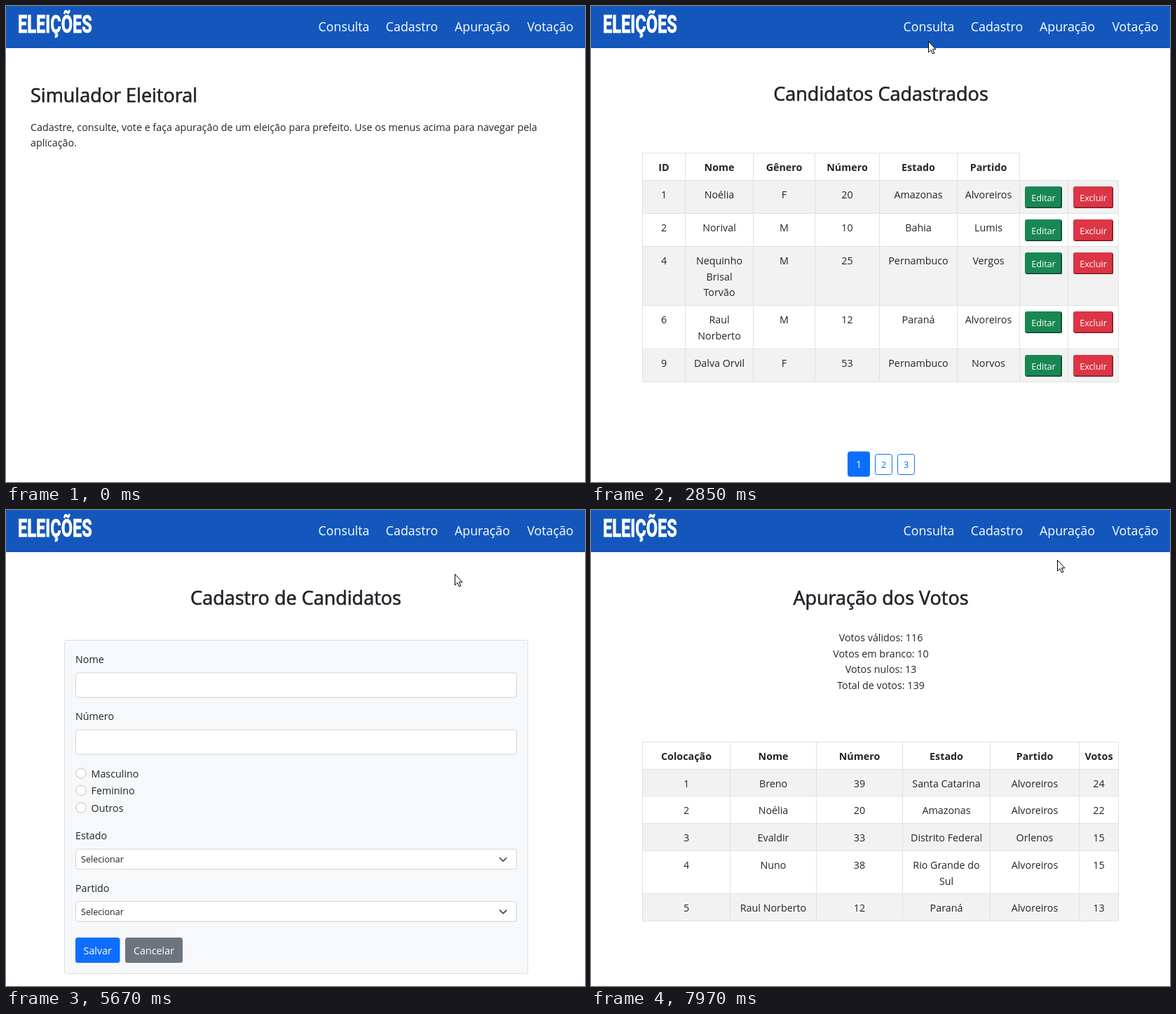
An HTML page that plays this animation: 826x678 px, repeating every 8 s.

```html
<!DOCTYPE html>
<html lang="pt-BR">
<head>
<meta charset="utf-8">
<title>Simulador Eleitoral</title>
<style>
html, body { margin: 0; width: 100%; height: 100%; overflow: hidden; background: #fff; }
svg { display: block; width: 100%; height: 100%; font: 14.3px "Open Sans", "Noto Sans", sans-serif; fill: #212529; }
.mid { text-anchor: middle; }
.bold { font-weight: 700; }
.title { font-size: 27px; stroke: #212529; stroke-width: .65px; }
.small { font-size: 12.6px; }
.nav { font-size: 17.8px; }
.brand { font: 700 34.5px Roboto, sans-serif; fill: #fff; stroke: #fff; stroke-width: .9px; }
.white { fill: #fff; }
.blue { fill: #0d6efd; }
</style>
</head>
<body>
<svg id="stage" viewBox="0 0 826 678"></svg>
<script>
const LOOP = 8000;
const MID = 413.5;
const LINE = 22.7;
const PAD = 16;
const LEFT = 73.5, WIDTH = 679;
const BORDER = '#dee2e6';

const text = (x, y, s, cls = '') => `<text x="${x}" y="${y}" class="${cls}">${s}</text>`;
const mid = (x, y, s, cls = '') => text(x, y, s, 'mid ' + cls);
const box = (x, y, w, h, fill, stroke = 'none', r = 0) =>
  `<rect x="${x}" y="${y}" width="${w}" height="${h}" rx="${r}" fill="${fill}" stroke="${stroke}"/>`;
const path = (d, stroke, extra = '') => `<path d="${d}" fill="none" stroke="${stroke}" ${extra}/>`;
const heading = s => mid(MID, 135, s, 'title');
const snap = v => Math.floor(v) + .5;

// Running edges of consecutive spans.
const edges = (start, sizes) => sizes.reduce((all, n) => [...all, all[all.length - 1] + n], [start]);

// Cells are split by "|", lines inside a cell by "/"; rows grow with their lines.
function table(top, widths, head, rows = [], minHeight = 0, extra = () => '') {
  const names = head.split('|');
  const cols = edges(LEFT, widths);
  const cells = [names, ...rows.map(r => r.split('|'))].map(r => r.map(c => c.split('/')));
  const heights = cells.map((r, i) =>
    Math.max(i ? minHeight : 0, PAD + LINE * Math.max(...r.map(c => c.length))));
  const ys = edges(top, heights).map(snap);
  const bottom = ys[ys.length - 1];
  let fills = '', lines = '', words = '';
  cells.forEach((row, r) => {
    if (r % 2) fills += box(LEFT, ys[r], WIDTH, ys[r + 1] - ys[r], '#f2f2f2');
    row.forEach((cell, c) => cell.forEach((s, n) =>
      words += mid(cols[c] + widths[c] / 2, ys[r] + 25.5 + n * LINE, s, r ? '' : 'bold')));
    if (r) words += extra(ys[r]);
  });
  ys.forEach((y, i) => lines += `M${LEFT} ${y}H${i ? LEFT + WIDTH : cols[names.length]}`);
  cols.forEach((x, i) => lines += `M${x} ${ys[i > names.length ? 1 : 0]}V${bottom}`);
  return fills + path(lines, BORDER) + words;
}

// Without rows, a fifth goes to the first column and the labels share the rest.
function emptyTable(top, head) {
  const pen = document.createElement('canvas').getContext('2d');
  pen.font = '700 14.3px "Open Sans", "Noto Sans", sans-serif';
  const first = WIDTH / 5;
  const sizes = head.split('|').slice(1).map(s => pen.measureText(s).width + PAD);
  const sum = sizes.reduce((a, b) => a + b);
  const widths = [first, ...sizes.map(n => n / sum * (WIDTH - first))];
  return table(top, widths, head) + box(LEFT, top + 39, first, PAD, '#f2f2f2', BORDER);
}

function rowButton(x, y, w, label, fill, shade) {
  return box(x, y, w, 31, fill, 'none', 3) +
    path(`M${x + 2} ${y + 30.2}H${x + w - 2}Q${x + w - .8} ${y + 30.2} ${x + w - .8} ${y + 29}V${y + 2}`, shade, 'stroke-width="1.6"') +
    mid(x + w / 2, y + 20.5, label, 'small white');
}

const listHead = 'ID|Nome|Gênero|Número|Estado|Partido';
const listPage = () => heading('Candidatos Cadastrados') +
  table(209.5, [61, 97, 88, 92, 111, 89, 69, 72], listHead, [
    '1|Noélia|F|20|Amazonas|Alvoreiros',
    '2|Norival|M|10|Bahia|Lumis',
    '4|Nequinho/Brisal/Torvão|M|25|Pernambuco|Vergos',
    '6|Raul/Norberto|M|12|Paraná|Alvoreiros',
    '9|Dalva Orvil|F|53|Pernambuco|Norvos'
  ], 47.2, y => rowButton(619, y + 8.5, 53, 'Editar', '#198754', '#0c432a') +
    rowButton(688, y + 8.5, 57, 'Excluir', '#dc3545', '#7a1d27')) +
  box(366, 634.5, 32, 36, '#0d6efd', 'none', 4) + mid(382, 658, '1', 'white') +
  [2, 3].map(n => {
    const x = 341.5 + 32 * n;
    return box(x, 638.5, 24, 29, '#fff', '#0d6efd', 3) + mid(x + 12, 657.5, n, 'small blue');
  }).join('');

function formPage() {
  const field = (y, label, h) => text(99, y, label) + box(99.5, y + 14, 629, h, '#fff', '#ced4da', 3.5);
  const select = (y, label) => field(y, label, 28.5) + text(107, y + 33, 'Selecionar', 'small') +
    path(`M704.5 ${y + 26.5}l4.7 4.7l4.7 -4.7`, '#343a40', 'stroke-width="1.6" stroke-linecap="round" stroke-linejoin="round"');
  const radio = (label, i) => `<circle cx="107" cy="${375 + 24.5 * i}" r="7.2" fill="#fff" stroke="#bfc0c1"/>` +
    text(121.5, 380.5 + 24.5 * i, label);
  const button = (x, w, label, fill) => box(x, 609, w, 36, fill, 'none', 3.5) + mid(x + w / 2, 632.5, label, 'white');
  return heading('Cadastro de Candidatos') + box(83.5, 185.5, 661, 475, '#f7f8fa', '#dcdee0', 3.5) +
    field(218, 'Nome', 35) + field(299, 'Número', 35) +
    ['Masculino', 'Feminino', 'Outros'].map(radio).join('') +
    select(469, 'Estado') + select(543.6, 'Partido') +
    button(99, 63.5, 'Salvar', '#0d6efd') + button(170, 82, 'Cancelar', '#6c757d');
}

const tallyHead = 'Colocação|Nome|Número|Estado|Partido|Votos';
const tally = (valid, blank, nulls, total) => heading('Apuração dos Votos') +
  [`Votos válidos: ${valid}`, `Votos em branco: ${blank}`, `Votos nulos: ${nulls}`, `Total de votos: ${total}`]
    .map((s, i) => mid(MID, 187 + i * LINE, s)).join('');
const tallyPage = () => tally(116, 10, 13, 139) +
  table(330.5, [125, 123, 123, 125, 127, 56], tallyHead, [
    '1|Breno|39|Santa Catarina|Alvoreiros|24',
    '2|Noélia|20|Amazonas|Alvoreiros|22',
    '3|Evaldir|33|Distrito Federal|Orlenos|15',
    '4|Nuno|38|Rio Grande do/Sul|Alvoreiros|15',
    '5|Raul Norberto|12|Paraná|Alvoreiros|13'
  ]);

const homePage = () => text(35, 137, 'Simulador Eleitoral', 'title') +
  text(35, 177.5, 'Cadastre, consulte, vote e faça apuração de um eleição para prefeito. Use os menus acima para navegar pela') +
  text(35, 177.5 + LINE, 'aplicação.');

const pages = [
  [0, homePage()],
  [2240, heading('Candidatos Cadastrados') + emptyTable(209.5, listHead)],
  [2310, listPage()],
  [4390, formPage()],
  [7210, tally(116, 0, 0, 0) + emptyTable(330.5, tallyHead)],
  [7350, tallyPage()]
];
const clicks = [[2180, 2240], [4260, 4390], [7080, 7210]];
const links = [['Consulta', 482], ['Cadastro', 579], ['Apuração', 679.5], ['Votação', 776.5]];

// Pointer moves: start, end, goal and, for curved ones, a control point.
const ENTRY = [766, 668];
const STEP = 68;
const moves = [
  [260, 880, [503, 68], [560, 200]],
  [1420, 1840, [487, 28]],
  [2570, 2850, [481, 50]],
  [2920, 3320, [562, 43], [510, 95]],
  [3390, 3660, [574, 28]],
  [5180, 5960, [648, 111], [658, 100]],
  [6490, 7010, [678, 29]],
  [7550, 7970, [665, 71]]
];

const stage = document.getElementById('stage');
stage.innerHTML = box(0, 0, 826, 678, '#fff') + box(0, 0, 826, 60, '#1357bd') +
  '<text class="brand" transform="translate(17 37.7) scale(.685 1)">ELEIÇÕES</text>' +
  links.map(([s, x]) => mid(x, 36, s, 'nav white')).join('') +
  pages.map(p => `<g class="page">${p[1]}</g>`).join('') +
  `<circle id="click" r="11.5" fill="#e6d700" fill-opacity=".6"/>
  <g id="pointer" fill="#fff" stroke="#000" stroke-linejoin="round">
    <path id="arrow" d="M.5 .5V16L4 12.7L6.5 18.2L8.9 17.1L6.4 11.7H11Z"/>
    <path id="hand" d="M-1.5 12V1.5C-1.5 -.6 1.7 -.6 1.7 1.5V7C1.7 5.5 4.6 5.5 4.6 7.5C5 6 7.6 6.2 7.6 8.5C8 7 10.3 7.5 10.3 9.5V14C10.3 17 8.5 18 8.5 21H0C0 19 -2 17.5 -5.5 12.5C-7 10 -4 8.5 -1.5 12ZM1.7 7V11M4.6 7.5V11M7.6 8.5V11.5"/>
  </g>`;

const [click, pointer, arrow, hand] = ['click', 'pointer', 'arrow', 'hand'].map(id => document.getElementById(id));
const pageNodes = stage.querySelectorAll('.page');
const linkNodes = stage.querySelectorAll('.nav');
const show = (node, on) => node.style.display = on ? '' : 'none';

// The pointer is redrawn in steps, so each move advances by whole ticks.
function pointerAt(t) {
  const i = moves.filter(m => t >= m[0]).length - 1;
  if (i < 0) return null;
  const [start, end, goal, bend] = moves[i];
  const from = i ? moves[i - 1][2] : ENTRY;
  const ticks = Math.round((end - start) / STEP);
  const tick = Math.floor((t - start) / (end - start) * ticks + 1e-6);
  const u = Math.min(1, (tick + 1) / (ticks + 1)), v = 1 - u;
  return goal.map((g, k) => {
    const c = bend ? bend[k] : (from[k] + g) / 2;
    return Math.round(v * v * from[k] + 2 * u * v * c + u * u * g);
  });
}

function render(t) {
  const current = pages.filter(p => t >= p[0]).length - 1;
  pageNodes.forEach((node, i) => show(node, i === current));
  const pos = pointerAt(t);
  const [x, y] = pos || [0, 0];
  const hovered = links.findIndex(([, cx]) => Math.abs(x - cx) < 38 && y < 43);
  linkNodes.forEach((node, i) => node.style.fill = i === hovered ? '#adb5bd' : '#fff');
  show(pointer, pos);
  show(hand, hovered >= 0);
  show(arrow, hovered < 0);
  pointer.setAttribute('transform', `translate(${x} ${y})`);
  show(click, clicks.some(([a, b]) => t >= a && t < b));
  click.setAttribute('cx', x - 1);
  click.setAttribute('cy', y + 1);
}

const began = performance.now();
function tick() {
  render((performance.now() - began) % LOOP);
  requestAnimationFrame(tick);
}
tick();
</script>
</body>
</html>
```
